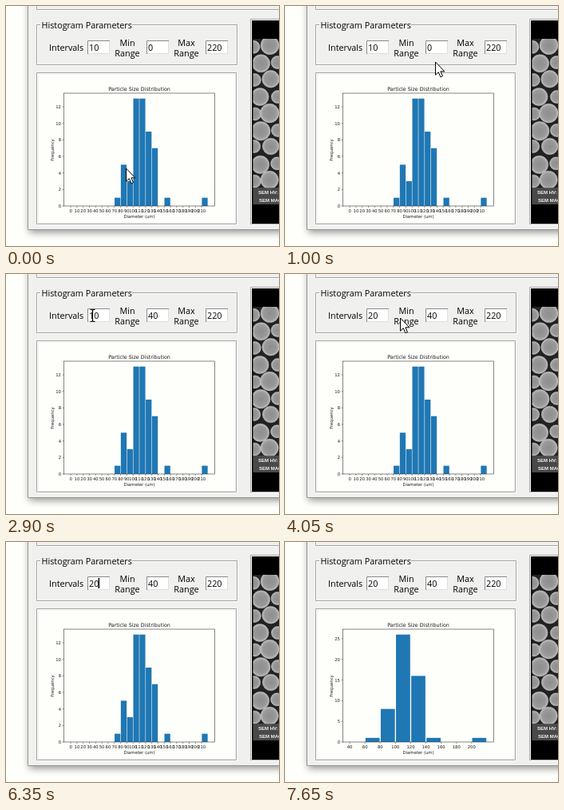
An HTML page that plays this animation: 342 by 300 pixels, repeating every 7700 ms.

```html
<!DOCTYPE html>
<html lang="en">
<head>
<meta charset="utf-8">
<title>Histogram parameters</title>
<style>
  html, body { margin: 0; width: 100%; height: 100%; overflow: hidden; background: #fefefb; }
  svg { display: block; width: 342px; height: 300px; }
  .ui { font: 10.8px "Open Sans", "Noto Sans", sans-serif; fill: #000; }
  .plot { font: 5.3px "DejaVu Sans", sans-serif; fill: #1a1a1a; }
  .title { font-size: 6.36px; }
  .sem { font: bold 6px "Liberation Sans", sans-serif; fill: #f2f2f2; }
  .mid { text-anchor: middle; }
  .end { text-anchor: end; }
</style>
</head>
<body>
<svg id="stage" viewBox="0 0 342 300">
  <defs>
    <filter id="blur" x="-20%" y="-20%" width="140%" height="140%"><feGaussianBlur stdDeviation="5"/></filter>
    <radialGradient id="ball">
      <stop offset="0" stop-color="#8e8e8e"/>
      <stop offset=".7" stop-color="#999"/>
      <stop offset="1" stop-color="#bcbcbc"/>
    </radialGradient>
    <clipPath id="photo"><rect x="309.5" y="41" width="33" height="207"/></clipPath>
  </defs>
</svg>
<script>
const LOOP = 7700, REDRAW = 6450;
const stage = document.getElementById('stage');

function add(parent, tag, attrs, text) {
  const el = document.createElementNS('http://www.w3.org/2000/svg', tag);
  for (const k in attrs) el.setAttribute(k, attrs[k]);
  if (text !== undefined) el.textContent = text;
  parent.append(el);
  return el;
}
const rect = (p, x, y, width, height, fill, more) => add(p, 'rect', { x, y, width, height, fill, ...more });
const line = (p, d, stroke, w = 1) => add(p, 'path', { d, stroke, 'stroke-width': w, fill: 'none' });
const label = (p, x, y, text, cls) => add(p, 'text', { x, y, class: cls }, text);
const show = (el, on) => el.setAttribute('visibility', on ? 'visible' : 'hidden');
const within = (t, a, b) => t >= a && t < b;

// Window and its frames
rect(stage, 29, -30, 360, 313, '#000', { opacity: .42, filter: 'url(#blur)' });
rect(stage, 27, -5, 330, 285, '#f0f0ee');
line(stage, 'M27.5 -1V279.5H343', '#969696');

function etched(d) {
  add(stage, 'path', { d, stroke: '#fff', fill: 'none', transform: 'translate(1 1)' });
  line(stage, d, '#a4a4a4');
}
etched('M38.5 -2V4.5H343');
etched('M43 23.5H38.5V73.5H289.5V23.5H158');
label(stage, 44.5, 28, 'Histogram Parameters', 'ui');
label(stage, 54, 56, 'Intervals', 'ui');

function field(i) {
  const x = 102 + 74 * i, w = 28;
  rect(stage, x, 43, w, 17, '#fff');
  line(stage, `M${x + .5} 60V43.5H${x + w}`, '#8a8a8a');
  line(stage, `M${x + 1} 59.5H${x + w - .5}V44`, '#dedede');
  if (i) {
    label(stage, x - 24, 50, i > 1 ? 'Max' : 'Min', 'ui mid');
    label(stage, x - 24, 63, 'Range', 'ui mid');
  }
  const mark = rect(stage, x + 2, 45, 7, 13.5, '#1874cd');
  const text = label(stage, x + 2, 56, '', 'ui');
  const caret = rect(stage, x + 13.6, 45, 1.5, 13, '#000');
  return { x, w, mark, text, caret };
}
const fields = [0, 1, 2].map(field);
const [intervals, low, high] = fields;

function setField(f, value, selected, caret) {
  f.text.textContent = value;
  f.text.style.fill = selected ? '#fff' : '#000';
  f.mark.setAttribute('width', 6.6 * value.length + .6);
  show(f.mark, selected);
  show(f.caret, caret);
}

// Charts
etched('M38.5 83.5H288.5V272.5H38.5Z');
rect(stage, 41, 86, 246, 185, '#fefefb');

function chart(from, step, yStep, counts) {
  const g = add(stage, 'g', { class: 'plot' });
  const left = 72.5, right = 261.5, top = 109, base = 250, fill = .93;
  const slot = (right - left) / 1.1 / counts.length;
  const start = left + (right - left) * .05 / 1.1;
  const peak = Math.max(...counts) * 1.05;
  const unit = (base - top) / peak;
  counts.forEach((n, i) => {
    const x = start + i * slot;
    if (n) rect(g, x + slot * (1 - fill) / 2, base - n * unit, slot * fill, n * unit, '#1f77b4');
    line(g, `M${x} ${base}v2`, '#333', .5);
    label(g, x, 257.7, from + i * step, 'mid');
  });
  for (let v = 0; v < peak; v += yStep) {
    const y = base - v * unit;
    line(g, `M${left} ${y}h-2`, '#333', .5);
    label(g, 69, y + 2, v, 'end');
  }
  rect(g, left, top, right - left, base - top, 'none', { stroke: '#333', 'stroke-width': .6 });
  label(g, 167, 106, 'Particle Size Distribution', 'title mid');
  label(g, 167, 265, 'Diameter (um)', 'mid');
  add(g, 'text', { class: 'mid', transform: 'translate(59.5 180) rotate(-90)' }, 'Frequency');
  return g;
}

// Counts per 10 um from 0 to 220; the coarse chart joins pairs of bins from 40 up
const bins = Array(22).fill(0);
[1, 5, 3, 13, 13, 9, 7, 0, 1].forEach((n, i) => bins[7 + i] = n);
bins[21] = 1;
const pairs = Array.from({ length: 9 }, (_, i) => bins[4 + 2 * i] + bins[5 + 2 * i]);
const fine = chart(0, 10, 2, bins);
const coarse = chart(40, 20, 5, pairs);

// Microscope picture: staggered rows of balls, a large and a small one in each
etched('M343 16.5H306.5V272.5H343');
rect(stage, 308, 18, 40, 254, '#000');
const photo = add(stage, 'g', { 'clip-path': 'url(#photo)' });
rect(photo, 309, 41, 40, 207, '#222');

let seed = 7;
function jitter(size) {
  seed = seed * 16807 % 2147483647;
  return (seed / 2147483647 - .5) * size;
}
function ball(cx, cy, r) {
  add(photo, 'circle', { cx, cy, r, fill: 'url(#ball)', stroke: '#c4c4c4', 'stroke-width': .5 });
}
for (let i = 0; i < 9; i++) {
  const y = 50 + 21 * i, odd = i % 2;
  ball((odd ? 340 : 311) + jitter(2), y + jitter(3), 8);
  ball((odd ? 319 : 331) + jitter(2), y + jitter(3), 11 + jitter(2));
}
rect(photo, 309, 227, 40, 21, '#505050', { opacity: .85 });
label(stage, 316, 235, 'SEM HV:', 'sem');
label(stage, 317, 244.5, 'SEM MAG:', 'sem');

// Pointer
const arrow = add(stage, 'path', {
  d: 'M0 0V16.2L3.8 12.7L6.4 18.8L9 17.7L6.4 11.8H11.4Z',
  fill: '#fff', stroke: '#000', 'stroke-linejoin': 'round'
});
const beam = line(stage, 'M-3 -7.5H-1L0 -6.5L1 -7.5H3M0 -6.5V6.5M-3 7.5H-1L0 6.5L1 7.5H3', '#000', 1.2);

// Stops of the pointer: time, x, y
const stops = [
  [0, 150.5, 203], [850, 158.5, 141], [1000, 188.5, 70], [1250, 179, 52], [2100, 228.5, 60],
  [2900, 108.5, 52], [3350, 84, 56], [3800, 176, 63], [4050, 144.5, 55], [4750, 348, 125]
];

function pointerAt(t) {
  const i = stops.findIndex(s => s[0] > t);
  if (i < 0) return null;
  const [t0, x0, y0] = stops[i - 1], [t1, x1, y1] = stops[i];
  const u = (t - t0) / (t1 - t0), e = u * u * (3 - 2 * u);
  return [x0 + (x1 - x0) * e, y0 + (y1 - y0) * e];
}

// The selected old value gives way to the new one, key by key
const typed = (t, start, before, after) =>
  t < start ? before : after.slice(0, 1 + Math.floor((t - start) / 150));

// 600 ms on, 300 ms off, held on while the chart is computed
const blink = t => within(t, 3750, REDRAW) && (Math.min(t, 5200) - 3400) % 900 < 600;

function draw(t) {
  setField(low, typed(t, 2250, '0', '40'), within(t, 1500, 2250), within(t, 2400, 2650));
  setField(intervals, typed(t, 3600, '10', '20'), within(t, 3250, 3600), blink(t));
  setField(high, '220', false, false);

  show(fine, t < REDRAW);
  show(coarse, t >= REDRAW);

  const p = pointerAt(t);
  const inField = !!p && within(p[1], 43, 60) && fields.some(f => within(p[0], f.x, f.x + f.w));
  show(arrow, p && !inField);
  show(beam, inField);
  if (p) for (const el of [arrow, beam]) el.setAttribute('transform', `translate(${p[0]} ${p[1]})`);
}

const began = performance.now();
function tick() {
  draw((performance.now() - began) % LOOP);
  requestAnimationFrame(tick);
}
tick();
</script>
</body>
</html>
```
